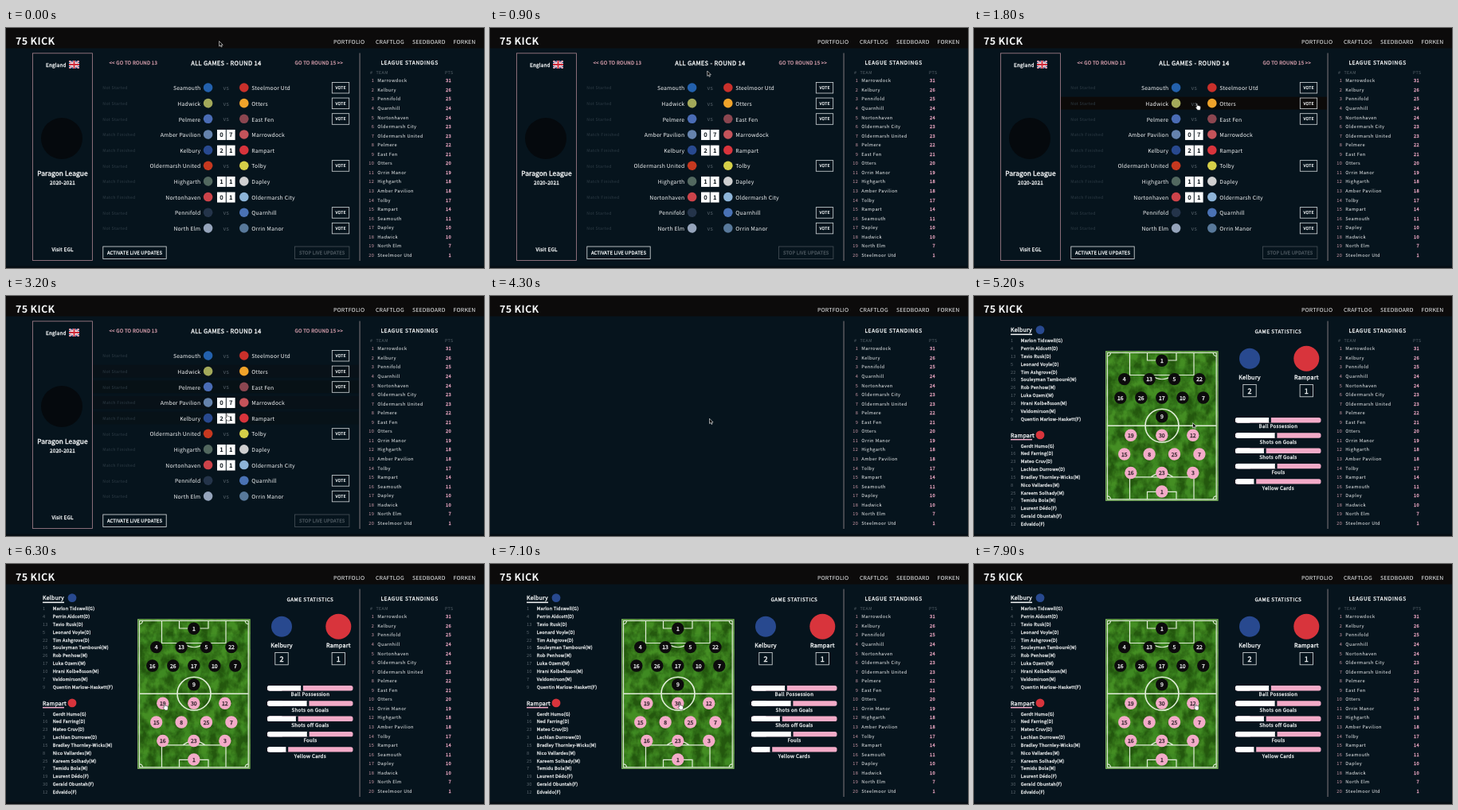
An HTML page that plays this animation: 600x302 px, repeating every 8 s.

```html
<!DOCTYPE html>
<html lang="en">
<head>
<meta charset="utf-8">
<title>Football scores</title>
<style>
  html, body { margin: 0; width: 100%; height: 100%; overflow: hidden; background: #06141d; }
  svg { display: block; width: 100vw; height: 100vh; }
  text {
    font-family: "Noto Sans CJK JP", "Noto Sans CJK SC", "Noto Sans CJK", "Noto Sans", sans-serif;
    white-space: pre; text-rendering: geometricPrecision;
  }
</style>
</head>
<body>
<svg id="stage" viewBox="0 0 600 302">
  <defs>
    <filter id="grass" x="0" y="0" width="1" height="1" color-interpolation-filters="sRGB">
      <feTurbulence type="fractalNoise" baseFrequency=".09 .07" numOctaves="4" seed="4"/>
      <feColorMatrix values="0 0 0 0 .1  0 0 0 0 .28  0 0 0 0 .03  0 0 0 2.6 -.85"/>
    </filter>
  </defs>
</svg>
<script>
const LOOP = 8000, LOAD = 3800, READY = 4400;
const WHITE = '#f4f6f7', PINK = '#f3abc8', ROSE = '#cf9aa8', BG = '#06141d', DIM = '#303e48', GREY = '#5b666e';
const stage = document.getElementById('stage');

function add(parent, tag, attrs, content) {
  const el = document.createElementNS('http://www.w3.org/2000/svg', tag);
  for (const key in attrs) el.setAttribute(key, attrs[key]);
  if (content !== undefined) el.textContent = content;
  parent.append(el);
  return el;
}
const group = (parent = stage) => add(parent, 'g', {});
const rect = (g, x, y, width, height, fill, more) => add(g, 'rect', { x, y, width, height, fill, ...more });
const frame = (g, x, y, w, h, stroke, width = 0.8) =>
  rect(g, x, y, w, h, 'none', { stroke, 'stroke-width': width });
const disc = (g, cx, cy, r, fill) => add(g, 'circle', { cx, cy, r, fill });
const path = (g, d, more) => add(g, 'path', { d, fill: 'none', ...more });

// align: s = start, m = middle, e = end; a thin outline gives the medium weight
function label(g, content, x, y, size, { fill = WHITE, weight = 400, align = 's', gap = 0.2 } = {}) {
  const anchor = { s: 'start', m: 'middle', e: 'end' }[align];
  return add(g, 'text', {
    x, y, fill, stroke: fill, 'stroke-width': weight === 500 ? size * 0.045 : 0,
    'font-size': size, 'font-weight': weight === 500 ? 400 : weight,
    'text-anchor': anchor, 'letter-spacing': gap
  }, content);
}

const TEAMS = {
  'Seamouth': '#2361ad', 'Steelmoor Utd': '#c9302b', 'Hadwick': '#a3a95a', 'Otters': '#f0a32a',
  'Pelmere': '#4a6cb5', 'East Fen': '#8b4650', 'Amber Pavilion': '#6583ad', 'Marrowdock': '#c4535a',
  'Kelbury': '#28498f', 'Rampart': '#d8343c', 'Oldermarsh United': '#c6381f', 'Tolby': '#d5cf48',
  'Highgarth': '#52685f', 'Dapley': '#cfcfd0', 'Nortonhaven': '#cc434a', 'Oldermarsh City': '#8db4d8',
  'Pennifold': '#24344a', 'Quarnhill': '#4a72b4', 'North Elm': '#95a4bb', 'Orrin Manor': '#58799b'
};

const MATCHES = [
  ['Seamouth', 'Steelmoor Utd'], ['Hadwick', 'Otters'], ['Pelmere', 'East Fen'],
  ['Amber Pavilion', 'Marrowdock', '07'], ['Kelbury', 'Rampart', '21'],
  ['Oldermarsh United', 'Tolby'], ['Highgarth', 'Dapley', '11'],
  ['Nortonhaven', 'Oldermarsh City', '01'], ['Pennifold', 'Quarnhill'], ['North Elm', 'Orrin Manor']
];

const STANDINGS = [
  ['Marrowdock', 31], ['Kelbury', 26], ['Pennifold', 25], ['Quarnhill', 24], ['Nortonhaven', 24],
  ['Oldermarsh City', 23], ['Oldermarsh United', 23], ['Pelmere', 22], ['East Fen', 21], ['Otters', 20],
  ['Orrin Manor', 19], ['Highgarth', 18], ['Amber Pavilion', 18], ['Tolby', 17], ['Rampart', 14],
  ['Seamouth', 11], ['Dapley', 10], ['Hadwick', 10], ['North Elm', 7], ['Steelmoor Utd', 1]
];

const HOME = ['1 Marlon Tidswell(G)', '4 Perrin Aldcott(D)', '13 Tavio Rusk(D)', '5 Leonard Voyle(D)',
  '22 Tim Ashgrove(D)', '16 Souleyman Tambouré(M)', '26 Rob Penhow(M)', '17 Luka Ozemi(M)',
  '10 Hrani Kolbeðsson(M)', '7 Valdomirson(M)', '9 Quentin Marlow-Haskett(F)'];
const AWAY = ['1 Gerdt Humo(G)', '16 Ned Farring(D)', '23 Mateo Cruv(D)', '3 Lachlan Durrowe(D)',
  '15 Bradley Thornley-Wicks(M)', '8 Nico Vallardes(M)', '25 Kareem Solhady(M)', '7 Temidu Bola(M)',
  '19 Laurent Dédo(F)', '30 Gerald Obuntah(F)', '12 Edvaldo(F)'];

// Rows of shirt numbers: y, spacing, numbers
const HOME_SHAPE = [[81.3, 0, [1]], [104.6, 31.4, [4, 13, 5, 22]], [128, 26, [16, 26, 17, 10, 7]], [151.8, 0, [9]]];
const AWAY_SHAPE = [[175.3, 39, [19, 30, 12]], [199, 31.4, [15, 8, 25, 7]], [222.5, 39, [16, 23, 3]], [246, 0, [1]]];

const rowY = i => 75.6 + i * 19.65;

function drawShell() {
  const g = group();
  rect(g, 0, 0, 600, 302, BG);
  rect(g, 0, 0, 600, 25.5, '#0c0b0b');
  rect(g, 0, 299.5, 600, 2.5, '#060e14');
  label(g, '75 KICK', 12, 21.4, 12.6, { weight: 700, gap: 0.3 });
  [['PORTFOLIO', 411], ['CRAFTLOG', 464], ['SEEDBOARD', 510]].forEach(([s, x]) => label(g, s, x, 19.5, 6.9, { gap: 0.2 }));
  label(g, 'FORKEN', 589.5, 19.5, 6.9, { align: 'e' });

  rect(g, 443.6, 31.5, 0.9, 261.5, '#8f8388');
  label(g, 'LEAGUE STANDINGS', 506.6, 45.5, 6.6, { weight: 500, align: 'm', gap: 0.65 });
  [['#', 457], ['TEAM', 464.5], ['PTS', 551]].forEach(([s, x]) => label(g, s, x, 58, 5.3, { fill: GREY, gap: 0.4 }));
  STANDINGS.forEach(([team, points], i) => {
    const y = 68.3 + i * 11.56;
    label(g, i + 1, 462.3, y, 5.7, { fill: ROSE, align: 'e', gap: 0.4 });
    label(g, team, 466.3, y, 5.7, { gap: 0.4 });
    label(g, points, 559, y, 5.7, { fill: PINK, weight: 500, align: 'e', gap: 0.4 });
  });
}

function drawFlag(g, x, y) {
  const flag = add(g, 'svg', { x, y, width: 13, height: 10, viewBox: '0 0 26 20', preserveAspectRatio: 'none' });
  rect(flag, 0, 0, 26, 20, '#27346f');
  path(flag, 'M0 0L26 20M26 0L0 20', { stroke: '#fff', 'stroke-width': 4 });
  path(flag, 'M0 0L26 20M26 0L0 20', { stroke: '#cf2b3a', 'stroke-width': 1.5 });
  path(flag, 'M13 0V20M0 10H26', { stroke: '#fff', 'stroke-width': 7 });
  path(flag, 'M13 0V20M0 10H26', { stroke: '#cf2b3a', 'stroke-width': 4 });
}

function drawList() {
  const g = group();
  frame(g, 33.5, 31.8, 75, 260.8, '#a9848f');
  label(g, 'England', 50, 48.8, 6.3, { weight: 500 });
  drawFlag(g, 79, 41);
  disc(g, 70, 139, 26, '#05090d');
  label(g, 'Paragon League', 71, 185.8, 8.4, { weight: 500, align: 'm', gap: 0.1 });
  label(g, '2020-2021', 71, 197.4, 6.3, { weight: 500, align: 'm' });
  label(g, 'Visit EGL', 71, 280.6, 6.3, { weight: 500, align: 'm' });

  label(g, '<< GO TO ROUND 13', 129.5, 46, 6.1, { fill: ROSE, weight: 500, gap: 0.2 });
  label(g, 'ALL GAMES - ROUND 14', 276.4, 46.6, 7.5, { weight: 500, align: 'm', gap: 0.35 });
  label(g, 'GO TO ROUND 15 >>', 423, 46, 6.1, { fill: ROSE, weight: 500, align: 'e', gap: 0.2 });

  const bands = MATCHES.map(([home, away, score], i) => {
    const y = rowY(i);
    const band = rect(g, 109, y - 8.6, 334, 16, '#0c0a09', { opacity: 0 });
    label(g, score ? 'Match Finished' : 'Not Started', 121.3, y + 1.8, 5.2, { fill: DIM, gap: 0.35 });
    label(g, home, 244.3, y + 2.6, 6.8, { align: 'e' });
    label(g, away, 308.3, y + 2.6, 6.8);
    disc(g, 253.6, y - 0.6, 5.8, TEAMS[home]);
    disc(g, 298.8, y - 0.6, 5.8, TEAMS[away]);
    if (score) {
      [...score].forEach((n, k) => {
        rect(g, 265 + k * 11.8, y - 6.6, 10.8, 13, '#fff');
        label(g, n, 270.4 + k * 11.8, y + 2.9, 7.6, { fill: '#0c151b', weight: 700, align: 'm', gap: 0 });
      });
    } else {
      label(g, 'vs', 276.3, y + 2.4, 7.2, { fill: '#56616a', align: 'm' });
      frame(g, 409.3, y - 7.2, 21.4, 13.6, '#d5dadd');
      label(g, 'VOTE', 420, y + 1.5, 5.1, { weight: 500, align: 'm', gap: 0.1 });
    }
    return band;
  });

  frame(g, 121.8, 275, 79.4, 15.4, '#dfe3e5');
  label(g, 'ACTIVATE LIVE UPDATES', 161.5, 284.9, 5.9, { weight: 500, align: 'm', gap: 0.15 });
  frame(g, 362.5, 275, 68.4, 15.4, '#465159');
  label(g, 'STOP LIVE UPDATES', 396.7, 284.9, 5.9, { fill: '#4c575f', weight: 500, align: 'm', gap: 0.15 });
  return { g, bands };
}

function drawLineup(g, team, players, y, color) {
  label(g, team, 46, y + 2.3, 7, { weight: 500 });
  rect(g, 46, y + 4.6, 27, 1.5, color);
  disc(g, 83, y - 0.4, 5.4, TEAMS[team]);
  players.forEach((player, i) => {
    const cut = player.indexOf(' '), base = y + 15.2 + i * 9.85;
    label(g, player.slice(0, cut), 46, base, 5.6, { fill: GREY });
    label(g, player.slice(cut + 1), 58.8, base, 5.6, { weight: 500 });
  });
}

function drawPitch(g) {
  rect(g, 165, 69.3, 141.5, 188.5, '#3f8a22');
  for (let i = 0; i < 10; i += 2) rect(g, 165, 69.3 + i * 18.85, 141.5, 18.85, '#448e23');
  rect(g, 165, 69.3, 141.5, 188.5, '#000', { filter: 'url(#grass)', opacity: 0.75 });
  frame(g, 165.6, 69.9, 140.3, 187.3, '#7fae66', 1.2);
  const chalk = { stroke: '#e0ecd8', 'stroke-width': 1.2 };
  path(g, 'M167.5 71.5H304.2V255.8H167.5Z', chalk);
  path(g, 'M167.5 163.2H304.2M215 163.2a21 21 0 0 0 42 0a21 21 0 0 0-42 0', { ...chalk, 'stroke-width': 1.6 });
  const end = 'M195.5 71.5V99.5H276V71.5M217.5 71.5V81H254V71.5M222 99.5Q236 110 250 99.5M167.5 75.5a4 4 0 0 0 4-4M304.2 75.5a4 4 0 0 1-4-4';
  path(g, end, chalk);
  path(g, end, { ...chalk, transform: 'matrix(1 0 0 -1 0 327.3)' });
}

function drawShape(g, shape, fill, ink) {
  return shape.flatMap(([y, step, numbers]) => numbers.map((n, i) => {
    const x = 235.8 + (i - (numbers.length - 1) / 2) * step;
    disc(g, x, y, 7.7, fill);
    label(g, n, x, y + 2.5, 6.8, { fill: ink, weight: 500, align: 'm', gap: 0 });
    return [x, y];
  }));
}

function drawDetail() {
  const g = group();
  drawLineup(g, 'Kelbury', HOME, 43, WHITE);
  drawLineup(g, 'Rampart', AWAY, 175.3, PINK);
  drawPitch(g);
  const dots = [...drawShape(g, HOME_SHAPE, '#0c0b0c', WHITE), ...drawShape(g, AWAY_SHAPE, PINK, '#2c1f27')];

  label(g, 'GAME STATISTICS', 381.9, 47.2, 6.3, { weight: 500, align: 'm', gap: 0.5 });
  [['Kelbury', 346, 13, 2], ['Rampart', 417.3, 16, 1]].forEach(([team, x, r, goals]) => {
    disc(g, x, 78.7, r, TEAMS[team]);
    label(g, team, x, 105, 7.2, { weight: 500, align: 'm' });
    frame(g, x - 8.2, 111.4, 16.4, 15.4, '#dfe3e5');
    label(g, goals, x, 122.6, 9, { weight: 500, align: 'm', gap: 0 });
  });
  [['Ball Possession', 371.5], ['Shots on Goals', 379], ['Shots off Goals', 365.3],
    ['Fouls', 379.2], ['Yellow Cards', 352.8]].forEach(([name, split], i) => {
    const y = 153 + i * 19.3;
    rect(g, 328, y, 107.5, 6.4, PINK, { rx: 2.6 });
    rect(g, 328, y, 20, 6.4, '#fff', { rx: 2.6 });
    rect(g, 331, y, split - 331, 6.4, '#fff');
    rect(g, split - 1.4, y - 0.2, 2.8, 6.8, BG);
    label(g, name, 381.9, y + 13.4, 6.2, { weight: 500, align: 'm', gap: 0.3 });
  });
  return { g, dots };
}

function drawPointer() {
  const g = group();
  const arrow = path(g, 'M0 0V6.4L1.5 5.1L2.5 7.3L3.6 6.8L2.6 4.7H4.6Z', { stroke: '#fff', 'stroke-width': 0.6 });
  arrow.setAttribute('fill', '#000');
  const hand = path(g, 'M0 .5Q.6-.5 1.2.5L1.7 3Q2.4 2.4 3 3.1Q3.7 2.7 4.2 3.4Q5.2 3.1 5.4 4.2V6.3L4.8 8.5H1.6L-.9 5.2Q-.9 4.2.5 4.8Z',
    { stroke: '#1a1a1a', 'stroke-width': 0.5 });
  hand.setAttribute('fill', '#fff');
  return { g, arrow, hand };
}

// Pointer route: time, x, y
const ROUTE = [
  [0, 267.6, 16.6], [300, 268, 20], [1000, 273, 56], [1450, 278, 92], [1800, 279, 94.8],
  [2500, 279, 97], [2940, 278, 100], [3190, 276.2, 148.5], [3600, 275.8, 153], [4300, 275.5, 154.2],
  [4800, 275.2, 156], [5200, 274.6, 159.6], [5700, 240, 166], [6200, 198, 175.5], [6500, 198, 175.5],
  [7000, 236, 175], [7300, 240, 175.5], [7800, 276.8, 175.5], [8000, 276.8, 175.5]
];

function pointerAt(t) {
  const i = Math.max(1, ROUTE.findIndex(p => p[0] >= t));
  const [t0, x0, y0] = ROUTE[i - 1], [t1, x1, y1] = ROUTE[i];
  const k = (t - t0) / (t1 - t0), ease = k * k * (3 - 2 * k);
  return [x0 + (x1 - x0) * ease, y0 + (y1 - y0) * ease];
}

function rowAt(t) {
  const y = pointerAt(Math.max(0, t))[1];
  return Math.floor((y - rowY(0) + 9.8) / 19.65);
}

drawShell();
const list = drawList(), detail = drawDetail(), pointer = drawPointer();
const show = (el, on) => el.setAttribute('display', on ? 'inline' : 'none');

function render(t) {
  const inList = t < LOAD, inDetail = t >= READY;
  show(list.g, inList);
  show(detail.g, inDetail);

  const [x, y] = pointerAt(t);
  pointer.g.setAttribute('transform', `translate(${x} ${y})`);
  const onDot = inDetail && detail.dots.some(([dx, dy]) => Math.hypot(dx - x, dy - y) < 7.7);
  const active = (inList && rowAt(t) >= 0) || onDot;
  show(pointer.hand, active);
  show(pointer.arrow, !active);

  // A row fades in over 300 ms of hovering and out again
  const fade = new Array(list.bands.length).fill(0);
  for (let i = 0; i < 20; i++) {
    const row = rowAt(t - i * 15);
    if (row >= 0 && row < fade.length) fade[row] += 0.05;
  }
  list.bands.forEach((band, i) => band.setAttribute('opacity', fade[i]));
}

const start = performance.now();
function tick() {
  render((performance.now() - start) % LOOP);
  requestAnimationFrame(tick);
}
tick();
</script>
</body>
</html>
```
